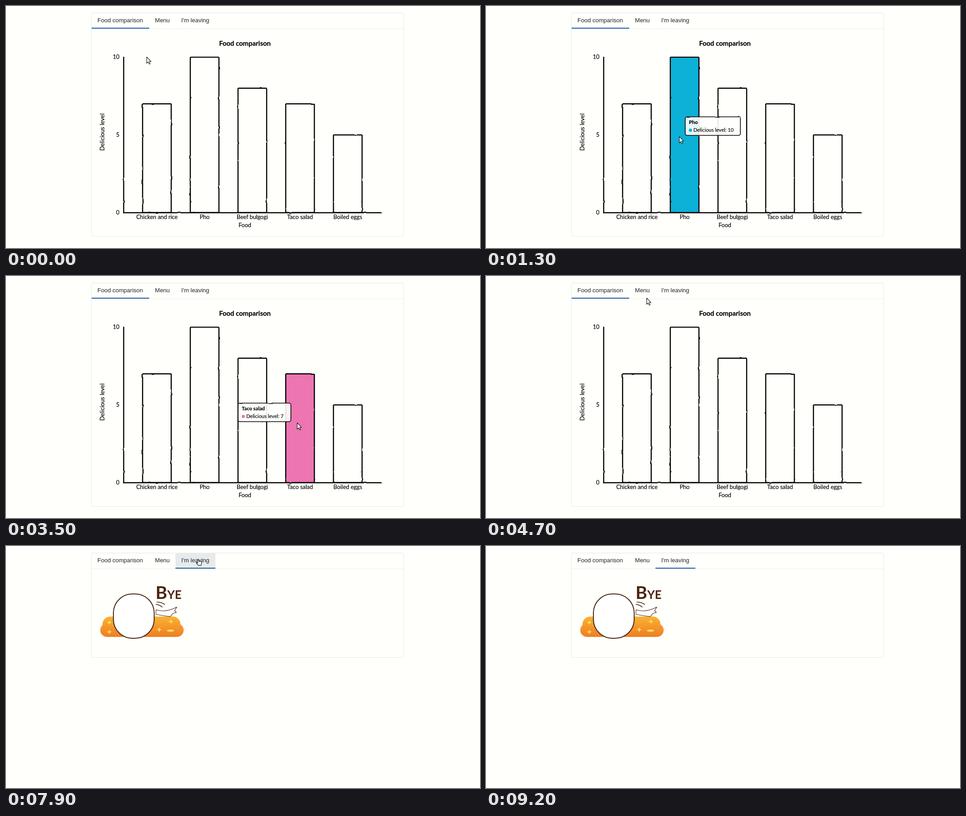
These frames come from a looping animation (1046 by 535 pixels, 9.5 s). An HTML page:

```html
<!DOCTYPE html>
<html lang="en">
<head>
<meta charset="utf-8">
<title>Food tabs</title>
<style>
  html, body { margin: 0; width: 100%; height: 100%; overflow: hidden; background: #fffffb; }
  #stage { display: block; width: 1046px; height: 535px; }
  text { font: 13px "Liberation Sans", Arial, sans-serif; fill: #212529; }
  .bold { font-weight: bold; }
  .line { fill: none; stroke: #dee2e6; }
  .sketch { fill: none; stroke: #000; stroke-width: 3; filter: url(#wobble); }
  #chart text { font: 15.4px Lato, sans-serif; fill: #000; stroke: #000; stroke-width: .2; }
  #chart .title { font-size: 18.2px; font-weight: bold; }
  #chart .axis { font-size: 16px; }
  #chart .tip { font-size: 13.6px; }
  #chart .tip.bold { font-weight: bold; }
  .mid { text-anchor: middle; }
  .end { text-anchor: end; }
  .ink { fill: none; stroke: #4a2413; stroke-width: 1.6; stroke-linecap: round; stroke-linejoin: round; }
  .pointer { fill: #fff; stroke: #111; stroke-width: 1.1; stroke-linejoin: round; }
</style>
</head>
<body>
<svg id="stage" viewBox="0 0 1046 535">
  <defs>
    <filter id="wobble" filterUnits="userSpaceOnUse" x="-5" y="-5" width="100%" height="100%">
      <feTurbulence type="fractalNoise" baseFrequency="0.05" result="noise"/>
      <feDisplacementMap scale="3" xChannelSelector="R" yChannelSelector="G" in="SourceGraphic" in2="noise"/>
    </filter>
    <linearGradient id="crust" gradientUnits="userSpaceOnUse" x1="0" y1="156" x2="0" y2="201">
      <stop stop-color="#f9b234"/><stop offset="1" stop-color="#ef7d25"/>
    </linearGradient>
    <path id="spark" d="M0-7Q0 0 7 0 0 0 0 7 0 0-7 0 0 0 0-7"/>
  </defs>

  <rect id="hover" y="16" height="34" fill="#e7ebeb"/>
  <rect id="card" class="line" x="188.5" y="15.5" width="689" rx="3.5" style="stroke:#e6e9ec"/>
  <path class="line" d="M189 50.5H877" style="stroke:#eceff0"/>
  <rect id="underline" y="48" height="2" fill="#1f5a9e"/>
  <g id="labels"></g>

  <svg id="chart" class="panel" x="201.9" y="63.9" width="650.6" height="433.8" viewBox="0 0 793.4 529" overflow="visible">
    <text class="title mid" x="396.7" y="30">Food comparison</text>
    <text class="mid" x="396.7" y="518">Food</text>
    <text class="axis mid" transform="translate(18 262) rotate(-90)">Delicious level</text>
    <g id="plot" transform="translate(70 60)">
      <g transform="translate(0 419)"><path class="sketch" d="M.5 0V.5H693.9V0"/></g>
      <path class="sketch" d="M-1 419.5H.5V.5H-1"/>
    </g>
    <svg id="tooltip" overflow="visible">
      <rect id="tipBox" class="sketch" x="5" y="5" height="50" rx="5" style="fill:#fffffb;fill-opacity:.9;stroke-width:2"/>
      <text id="tipTitle" class="tip bold" x="15" y="25"></text>
      <rect id="tipSwatch" x="15" y="37" width="8" height="8" rx="2" filter="url(#wobble)"/>
      <text id="tipText" class="tip" x="27" y="45"></text>
    </svg>
  </svg>

  <g id="menu" class="panel"></g>

  <g class="panel">
    <g fill="url(#crust)">
      <rect x="213" y="156" width="172" height="34" rx="17"/>
      <rect x="208" y="171" width="184" height="30" rx="15"/>
    </g>
    <g fill="#fbdc58">
      <use href="#spark" x="228" y="169"/>
      <use href="#spark" x="228" y="190"/>
      <use href="#spark" x="364" y="167"/>
      <use href="#spark" x="338" y="185"/>
      <ellipse cx="363" cy="187" rx="8" ry="2.4"/>
    </g>
    <path class="ink" d="M333 124Q343 124 350 129M331 129Q339 130 345 135"/>
    <path class="ink" style="fill:#fff;stroke-width:1.1" d="M331 141Q352 148 377 135L372 143 376 147Q368 147 363 156 350 155 331 151Z"/>
    <rect class="ink" style="fill:#fff;stroke-width:2" x="237" y="106" width="90" height="98" rx="42"/>
    <text x="330" y="117" style="font:bold 39px Lato,sans-serif;fill:#4a2413">B<tspan font-size="26">YE</tspan></text>
  </g>

  <path id="arrow" class="pointer" d="M.6.6V14.6L3.8 11.6 6 16.6 8.2 15.7 6 10.8H10.2Z"/>
  <path id="hand" class="pointer" d="M4 9V1.8a1.3 1.3 0 0 1 2.6 0V5H11a1.5 1.5 0 0 1 1.5 1.5V10l-1 3.6H5L.8 8.4Q1.8 6.6 4 9Z"/>
</svg>
<script>
const $ = id => document.getElementById(id);

function set(node, attrs) {
  for (const name in attrs) node.setAttribute(name, attrs[name]);
}

function add(parent, tag, attrs, text = "") {
  const node = document.createElementNS("http://www.w3.org/2000/svg", tag);
  set(node, attrs);
  node.textContent = text;
  parent.append(node);
  return node;
}

const show = (node, visible) => { node.style.display = visible ? "" : "none"; };
const clamp = (v, min, max) => Math.min(Math.max(v, min), max);
const easeOut = k => 1 - (1 - k) ** 2;

const LOOP = 9500, STEP = 100;
const SCALE = .82, CHART_X = 201.9, CHART_Y = 63.9;
const PLOT_W = 693.4, PLOT_H = 419;

const tabs = [
  { label: "Food comparison", x: 189, width: 127, opens: 0, bottom: 509.5 },
  { label: "Menu", x: 316, width: 58, opens: 5600, bottom: 206.5 },
  { label: "I'm leaving", x: 374, width: 88, opens: 7900, bottom: 246.5 }
];
const foods = [
  { name: "Chicken and rice", level: 7, color: "#e04a2c" },
  { name: "Pho", level: 10, color: "#10b0d7" },
  { name: "Beef bulgogi", level: 8, color: "#f2db60" },
  { name: "Taco salad", level: 7, color: "#ec74b2" },
  { name: "Boiled eggs", level: 5, color: "#4ab74e" }
];
const start = { x: 310, y: 112 };
const moves = [
  { from: 100, to: 1100, x: 351, y: 285 },    // first bar
  { from: 1100, to: 1200, x: 426, y: 288 },   // second bar
  { from: 1600, to: 2300, x: 545, y: 294 },   // third bar
  { from: 2700, to: 3200, x: 642, y: 324 },   // fourth bar
  { from: 3500, to: 4200, x: 538, y: 108 },   // off the bars
  { from: 4600, to: 4700, x: 354, y: 48 },    // below the tabs
  { from: 4800, to: 4900, x: 327, y: 30 },    // second tab
  { from: 5000, to: 5800, x: 338, y: 34 },
  { from: 7100, to: 7400, x: 419, y: 29 },    // third tab
  { from: 8600, to: 9200, x: -20, y: -20 }    // off the stage
];

for (const tab of tabs) add($("labels"), "text", { x: tab.x + 12.8, y: 36.2 }, tab.label);

// Band scale: gaps are 40% of a band, with the same padding at both ends.
const band = PLOT_W / (foods.length + .4);
foods.forEach((food, i) => {
  const x = band * (i + .4), height = PLOT_H * food.level / 10;
  food.bar = add($("plot"), "rect", { class: "sketch", x, y: PLOT_H - height, width: band * .6, height, rx: 2 });
  food.left = CHART_X + SCALE * (70 + x);
  food.right = food.left + SCALE * band * .6;
  food.top = CHART_Y + SCALE * (60 + PLOT_H - height);
  add($("plot"), "text", { class: "mid", x: x + band * .3, y: PLOT_H + 17 }, food.name);
});
for (const level of [0, 5, 10])
  add($("plot"), "text", { class: "end", x: -11, y: PLOT_H * (1 - level / 10) + 5 }, level);

[["Food", "Price"], ["Chicken and rice", 8], ["Pho", 10], ["Beef bulgogi", 8]].forEach((row, r) => {
  const y = 64.5 + 30 * r;
  row.forEach((value, c) => {
    const x = c ? 321.5 : 202.5;
    add($("menu"), "rect", { class: "line", x, y, width: c ? 55 : 119, height: 30, style: r % 2 ? "fill:#f4f4f8" : "" });
    add($("menu"), "text", { class: r ? "" : "bold", x: x + 10.7, y: y + 18.8 }, value);
  });
});

function pointerAt(t) {
  let { x, y } = start;
  for (const move of moves) {
    const k = easeOut(clamp((t - move.from) / (move.to - move.from), 0, 1));
    x += (move.x - x) * k;
    y += (move.y - y) * k;
  }
  return { x, y };
}

function drawTooltip(food, t) {
  // The tooltip trails the pointer by one step.
  const trail = pointerAt(t - STEP);
  const x = clamp(trail.x, food.left, food.right);
  const label = `Delicious level: ${food.level}`;
  const width = label.length * 6.5 + 25;
  const opensRight = foods.indexOf(food) < 2;
  const boxX = opensRight ? x + 13.6 : x - 13.4 - width * SCALE;
  set($("tooltip"), { x: (boxX - CHART_X) / SCALE - 5, y: (trail.y - 43 - CHART_Y) / SCALE - 5 });
  $("tipBox").setAttribute("width", width);
  $("tipSwatch").setAttribute("fill", food.color);
  $("tipTitle").textContent = food.name;
  $("tipText").textContent = label;
}

function draw(now) {
  const t = Math.floor(now % LOOP / STEP) * STEP;
  const { x, y } = pointerAt(t);
  const page = tabs.filter(tab => t >= tab.opens).length - 1;
  const { x: tabX, width, bottom } = tabs[page];

  document.querySelectorAll(".panel").forEach((panel, i) => show(panel, i === page));
  $("card").setAttribute("height", bottom - 15.5);
  set($("underline"), { x: tabX, width });

  const hoverTab = tabs.find(tab => y > 16 && y < 45 && x >= tab.x && x < tab.x + tab.width);
  show($("hover"), hoverTab);
  if (hoverTab) set($("hover"), { x: hoverTab.x, width: hoverTab.width });

  const hoverFood = page === 0 && foods.find(f => x > f.left && x < f.right && y > f.top);
  for (const food of foods) food.bar.style.fill = food === hoverFood ? food.color : "none";
  show($("tooltip"), hoverFood);
  if (hoverFood) drawTooltip(hoverFood, t);

  show($("hand"), hoverTab);
  show($("arrow"), !hoverTab);
  $(hoverTab ? "hand" : "arrow").setAttribute("transform", `translate(${x} ${y})`);
}

function tick() {
  draw(performance.now());
  requestAnimationFrame(tick);
}
tick();
</script>
</body>
</html>
```
